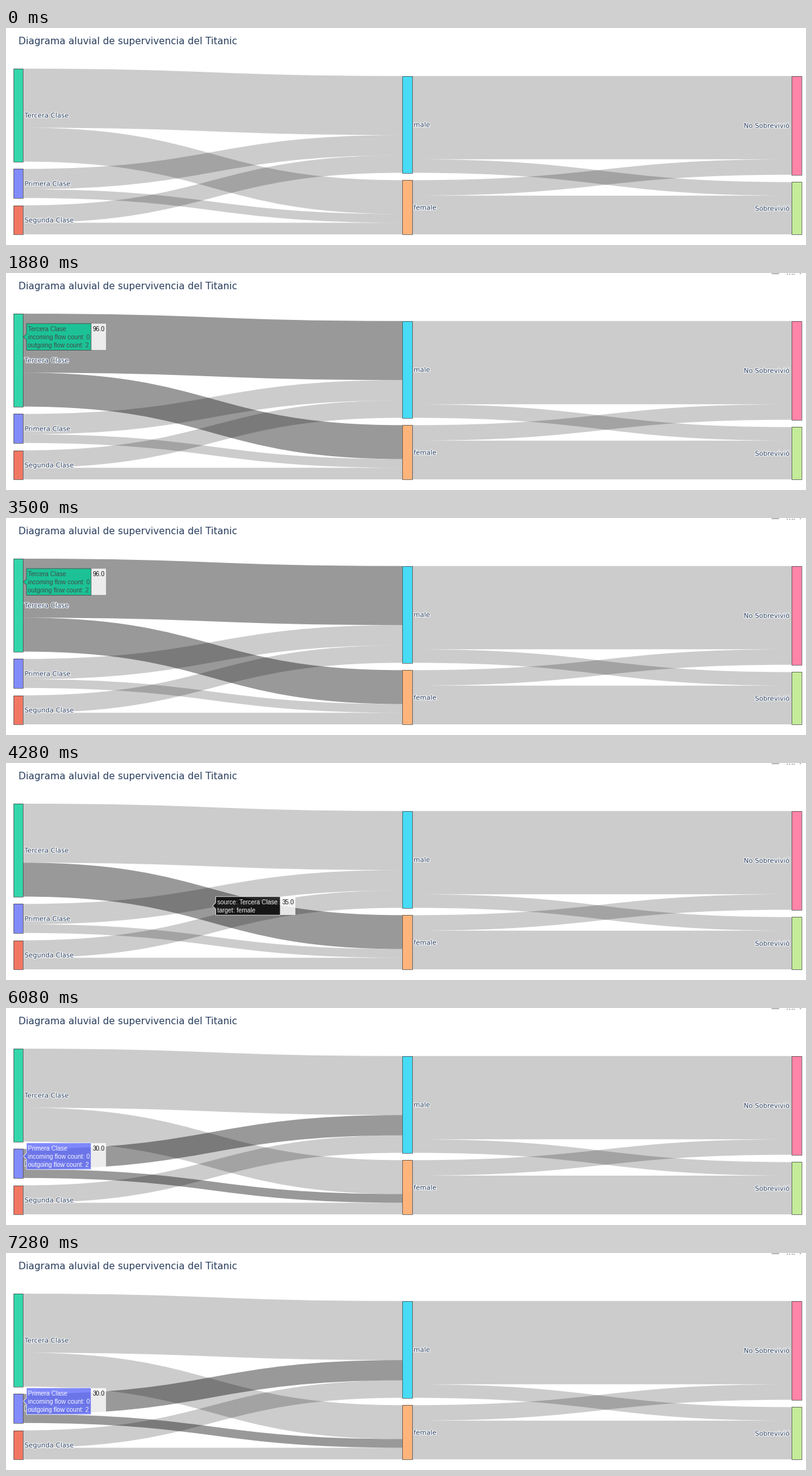
These frames come from a looping animation (1280x347 px, 8000 ms). A matplotlib script:

```python
import matplotlib.pyplot as plt
from matplotlib.animation import FuncAnimation
from matplotlib.patches import PathPatch, Polygon, Rectangle
from matplotlib.patheffects import withStroke
from matplotlib.path import Path

W, H, DPI = 1280, 347, 64
PT = 72 / DPI                      # points per pixel
STEP, LOOP = 20, 8000              # ms
BOTTOM, UNIT, PAD = 330, 1.548, 11.75
NODE_W = 15.5
COLUMN_X = (11.5, 634, 1257)
INK = "#2a3f5f"
TIP_ALPHA = 0.82

# key: (column, label, count, colour)
NODES = {
    "T": (0, "Tercera Clase", 96, "#00cc96"),
    "P": (0, "Primera Clase", 30, "#636efa"),
    "S": (0, "Segunda Clase", 30, "#ef553b"),
    "m": (1, "male", 100, "#19d3f3"),
    "f": (1, "female", 56, "#ffa15a"),
    "N": (2, "No Sobrevivió", 102, "#ff6692"),
    "Y": (2, "Sobrevivió", 54, "#b6e880"),
}
LINKS = {"Tm": 61, "Tf": 35, "Pm": 21, "Pf": 9, "Sm": 18, "Sf": 12,
         "mN": 86, "mY": 14, "fN": 16, "fY": 40}

# (start in ms, hovered node or link)
HOVERS = [(0, ""), (500, "Tm"), (1880, "T"), (1940, "Tm"), (2120, "Tf"),
          (3500, "T"), (4280, "Tf"), (5180, ""), (5240, "Pm"), (6080, "P"),
          (6260, "Pm"), (6320, "Pf"), (6980, "Pm"), (7040, "P"),
          (7220, "Pm"), (7280, "P")]
TOOLBAR = [(0, 0), (500, 0.3), (560, 0.65), (680, 1)]

fig = plt.figure(figsize=(W / DPI, H / DPI), dpi=DPI, facecolor="white")
ax = fig.add_axes([0, 0, 1, 1])
ax.set_xlim(0, W)
ax.set_ylim(H, 0)
ax.axis("off")


def write(x, y, text, size, color, font="DejaVu Sans", **kw):
    return ax.text(x, y, text, fontsize=size * PT, color=color, family=font,
                   va="baseline", **kw)


def node_tops():
    tops = {}
    for col in range(3):
        y = BOTTOM
        for key in reversed([k for k in NODES if NODES[k][0] == col]):
            y -= NODES[key][2] * UNIT
            tops[key] = y
            y -= PAD
    return tops


def band(x0, y0, x1, y1, h):
    mid = (x0 + x1) / 2
    points = [(x0, y0), (mid, y0), (mid, y1), (x1, y1),
              (x1, y1 + h), (mid, y1 + h), (mid, y0 + h), (x0, y0 + h),
              (x0, y0)]
    codes = ([Path.MOVETO] + [Path.CURVE4] * 3 + [Path.LINETO]
             + [Path.CURVE4] * 3 + [Path.CLOSEPOLY])
    return PathPatch(Path(points, codes), fc="black", lw=0, alpha=0.2)


def tooltip(x, y, lines, count, fill, ink):
    half = (13 * len(lines) + 3.5) / 2
    left, right = x + 5, x + 108.3
    side = Rectangle((right, y - half), 24, 2 * half, fc="white", lw=0,
                     alpha=TIP_ALPHA, zorder=5)
    box = Polygon([(x, y), (left, y + 5), (left, y + half), (right, y + half),
                   (right, y - half), (left, y - half), (left, y - 5)],
                  fc=fill, ec=ink, lw=0.9 * PT, alpha=TIP_ALPHA, zorder=6)
    ax.add_patch(side)
    ax.add_patch(box)
    parts = [side, box]
    base = y - 6.5 * (len(lines) - 1) + 3.6
    for i, line in enumerate(lines):
        parts.append(write(left + 2, base + 13 * i, line, 10, ink,
                           "Liberation Sans", alpha=0.92, zorder=7))
    parts.append(write(right + 2.4, base, f"{count:.1f}", 10, "black",
                       "Liberation Sans", alpha=0.9, zorder=7))
    for part in parts:
        part.set_visible(False)
    return parts


tops = node_tops()
links, tips = {}, {}

out_y, in_y = dict(tops), dict(tops)
for key, count in LINKS.items():
    a, b = key
    h = count * UNIT
    x0 = COLUMN_X[NODES[a][0]] + NODE_W
    x1 = COLUMN_X[NODES[b][0]]
    links[key] = ax.add_patch(band(x0, out_y[a], x1, in_y[b], h))
    if a in "TP":
        lines = [f"source: {NODES[a][1]}", f"target: {NODES[b][1]}"]
        tips[key] = tooltip((x0 + x1) / 2, (out_y[a] + in_y[b] + h) / 2,
                            lines, count, "black", "white")
    out_y[a] += h
    in_y[b] += h

for key, (col, label, count, color) in NODES.items():
    x, y, h = COLUMN_X[col], tops[key], count * UNIT
    ax.add_patch(Rectangle((x, y), NODE_W, h, fc=color, lw=0, alpha=0.8,
                           zorder=2))
    ax.add_patch(Rectangle((x, y), NODE_W, h, fc="none", ec="#444444",
                           lw=0.9 * PT, alpha=0.8, zorder=3))
    last = col == 2
    write(x - 2.3 if last else x + NODE_W + 2.6, y + h / 2 + 4, label, 10.6,
          INK, ha="right" if last else "left", zorder=4,
          path_effects=[withStroke(linewidth=2 * PT, foreground="white")])
    if key in "TP":
        lines = [label, "incoming flow count: 0", "outgoing flow count: 2"]
        tips[key] = tooltip(x + NODE_W + 0.8, y + h / 4, lines, count, color,
                            "#444444" if key == "T" else "white")

write(19.5, 26, "Diagrama aluvial de supervivencia del Titanic", 15.3, INK)

# lower edge of the toolbar icons, cut off by the top of the stage
icons = [(1225, 0, 12, 2.4)]
icons += [(1249.3 + 3.6 * i, 1, 2, 2) for i in range(4)]
icons += [(1269.5, 0, 2.5, 1.6)]
toolbar = [ax.add_patch(Rectangle((x, y), w, h, fc="#b9b9b9", lw=0))
           for x, y, w, h in icons]


def at(track, t):
    return [value for start, value in track if start <= t][-1]


def update(frame):
    t = frame * STEP
    hover = at(HOVERS, t)
    for key, link in links.items():
        link.set_alpha(0.4 if hover and key.startswith(hover) else 0.2)
    for key, parts in tips.items():
        for part in parts:
            part.set_visible(key == hover)
    for icon in toolbar:
        icon.set_alpha(at(TOOLBAR, t))
    return []


anim = FuncAnimation(fig, update, frames=LOOP // STEP, interval=STEP,
                     repeat=True, repeat_delay=0, blit=False)
plt.show()
```
